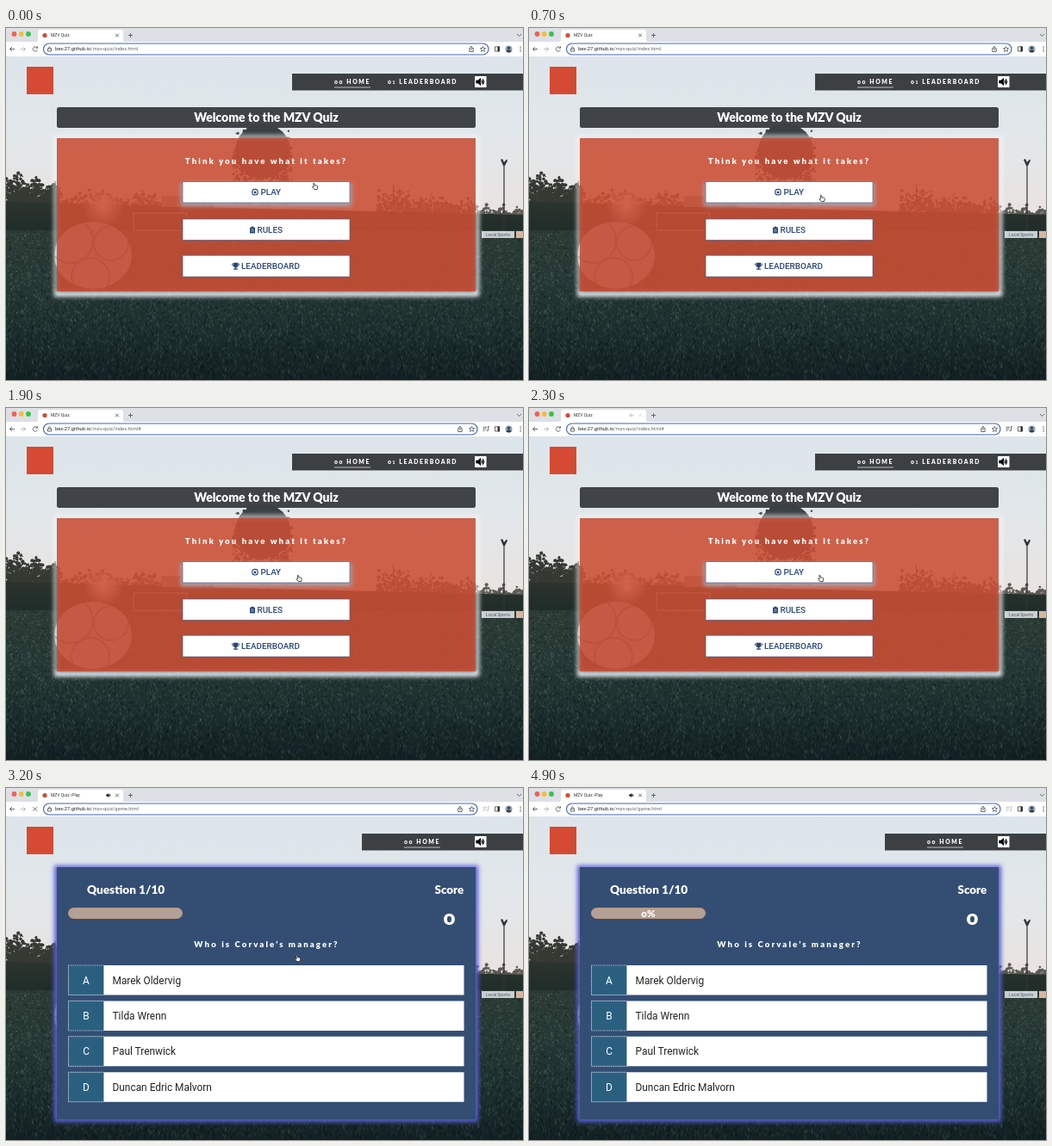
These frames come from a looping animation (600 px wide and 409 px high, 5000 ms). An HTML page with a canvas:

```html
<!DOCTYPE html>
<html lang="en">
<head>
<meta charset="utf-8">
<title>MZV Quiz</title>
<style>
  html, body { margin: 0; width: 100%; height: 100%; overflow: hidden; background: #1b2a2e; }
  canvas, svg { position: absolute; left: 0; top: 0; width: 600px; height: 409px; }
  text { font-family: Roboto, Inter, sans-serif; white-space: pre; }
  .head, .head text { font-family: Lato, sans-serif; font-weight: 900; fill: #fff; }
  .mid { text-anchor: middle; }
  .wide { font-size: 9.6px; letter-spacing: 2.1px; }
  .nav { font-size: 6.8px; letter-spacing: 1.6px; }
  .btn { font-size: 9.9px; font-weight: 500; fill: #27467a; }
  .ans { font-size: 11.9px; fill: #222; }
  .line { fill: none; stroke: #555b62; stroke-width: .9; }
</style>
</head>
<body>
<canvas id="photo" width="600" height="409"></canvas>
<svg viewBox="0 0 600 409">
  <defs>
    <filter id="glow" x="-10%" y="-20%" width="120%" height="140%"><feGaussianBlur stdDeviation="2.6"/></filter>
    <clipPath id="tabClip"><path d="M51 2H113V16H51z"/></clipPath>
    <path id="speaker" d="M0 -1.5H2L5 -4V4L2 1.5H0zM6.2 -2Q7.8 0 6.2 2M7.6 -3.6Q10.4 0 7.6 3.6" stroke="#111" stroke-width=".9"/>
  </defs>

  <!-- browser bar -->
  <path fill="#dde1e6" d="M0 0H600V17H0z"/>
  <path fill="#fff" d="M34 17Q37 17 37 13V5Q37 2 40 2H133Q136 2 136 5V13Q136 17 139 17zM0 16H600V33H0z"/>
  <circle cx="9.5" cy="7" r="2.9" fill="#f25f57"/>
  <circle cx="17.7" cy="7" r="2.9" fill="#f6bc3a"/>
  <circle cx="26" cy="7" r="2.9" fill="#35c24a"/>
  <circle cx="45" cy="8.5" r="2.6" fill="#d64a33"/>
  <text id="tab" x="52" y="10.4" font-size="5" fill="#333" clip-path="url(#tabClip)"></text>
  <g id="tabSound" transform="translate(116.5 8.5) scale(.5)"><use href="#speaker"/></g>
  <path id="tabClose" class="line" d="M127.2 6.7L130.8 10.3M130.8 6.7L127.2 10.3"/>
  <path class="line" d="M144.5 6V11M142 8.5H147M593 7L595.5 9.5L598 7"/>
  <path class="line" d="M10 24.5H4.5M7 22L4.5 24.5L7 27"/>
  <path class="line" stroke-opacity=".45" d="M17 24.5H22.5M20 22L22.5 24.5L20 27"/>
  <path id="reload" class="line" d="M36.2 23A2.7 2.7 0 1 0 36.4 25.6M36.5 21.3V23.3H34.5"/>
  <path id="stop" class="line" d="M31.5 22.2L36 26.7M36 22.2L31.5 26.7"/>
  <rect id="bar" x="43.5" y="18" height="13" rx="6.5" fill="#fff" stroke="#4565b5" stroke-width="1.2"/>
  <path class="line" d="M48.5 24H52.5V27H48.5zM49.3 24V22.8Q50.5 20.8 51.7 22.8V24"/>
  <text x="57" y="26.4" font-size="5.8" fill="#222">bex-27.github.io<tspan id="path" fill="#666"></tspan></text>
  <path id="share" class="line" d="M-1 -1H-2.2V3H2.2V-1H1M0 1.5V-3.2M-1.3 -2L0 -3.3L1.3 -2"/>
  <path id="star" class="line" d="M0 -3L.9 -1L3 -.8L1.4 .7L1.9 2.8L0 1.7L-1.9 2.8L-1.4 .7L-3 -.8L-.9 -1z"/>
  <path id="music" class="line" d="M553.5 22.3H558M553.5 24.3H557M553.5 26.3H555.5M559.5 21.5V26.3M557.5 26.4H559.5M559.5 21.7H561"/>
  <path class="line" d="M567.5 21.8H572.5V27H567.5z"/><path fill="#333" d="M570.5 21.5H573V27.3H570.5z"/>
  <circle cx="583.5" cy="24.5" r="4" fill="#8fa3b4"/>
  <path fill="#34404b" d="M580.3 27Q583.5 23.5 586.7 27Q583.5 30 580.3 27z"/><circle cx="583.5" cy="23.2" r="1.6" fill="#34404b"/>
  <path fill="#444" d="M596.5 21.5h1.2v1.2h-1.2zm0 2.4h1.2v1.2h-1.2zm0 2.4h1.2v1.2h-1.2z"/>

  <!-- site header -->
  <rect x="24" y="45" width="31" height="32" fill="#d64a33"/>
  <path id="navBar" fill="#3c4043"/>
  <!-- lowercase o stands for the old-style zero -->
  <g id="home" class="head nav"><text y="65">oo HOME</text><path d="M0 69H42" stroke="#ddd" stroke-width=".8"/></g>
  <rect x="544" y="56" width="13.5" height="13" fill="#fff"/>
  <use href="#speaker" transform="translate(545.8 62.5)"/>

  <g id="menu">
    <text class="head nav" x="443" y="65">o<tspan font-size="5">1</tspan> LEADERBOARD</text>
    <path d="M56 125H549V312H56zM59 128V306H545V128z" fill="#f2f4fb" fill-rule="evenodd" filter="url(#glow)"/>
    <rect x="59" y="92" width="486" height="24" rx="2.5" fill="#3b3e43" fill-opacity=".97"/>
    <text class="head mid" x="302" y="109" font-size="14">Welcome to the MZV Quiz</text>
    <path d="M59 128H545V306H59z" fill="#cb4e35" fill-opacity=".88"/>
    <text class="head mid wide" x="302" y="157.5">Think you have what it takes?</text>
    <path d="M203 180H401V207H203z" fill="#a3b4c4" fill-opacity=".8" filter="url(#glow)"/>
    <path d="M205 178.5H399V203H205zM205 222H399V246.5H205zM205 264.2H399V289H205z" fill="#fff" stroke="#4a5f8c" stroke-width=".7"/>
    <text class="btn" x="295.5" y="194">PLAY</text>
    <text class="btn" x="291.5" y="237.7">RULES</text>
    <text class="btn" x="273" y="279.7">LEADERBOARD</text>
    <circle cx="289" cy="190.7" r="3.3" fill="#fff" stroke="#27467a" stroke-width="1.1"/>
    <path fill="#27467a" d="M289 189.2L290.6 190.4L290 192.2H288L287.4 190.4zM288 187h2v1h-2zM285.5 193l2 0l0 1.6zM292.5 193l-2 0l0 1.6z"/>
    <path fill="#27467a" d="M283 231.8H284.6V230.8H287.4V231.8H289V238.6H283z"/>
    <path stroke="#fff" stroke-width=".6" d="M284.3 234H287.7M284.3 236H287.7"/>
    <path fill="#27467a" d="M264 272.8H269V276Q269 278 267.2 278.4V279.5H269V280.7H264V279.5H265.8V278.4Q264 278 264 276z"/>
    <path fill="none" stroke="#27467a" stroke-width=".9" d="M264 274H262.4Q262.4 276.7 265 277M269 274H270.6Q270.6 276.7 268 277"/>
  </g>

  <g id="game">
    <path d="M56 90H548V388H56z" fill="#5a62d8" filter="url(#glow)"/>
    <path d="M59 92H545V385H59z" fill="#344e73"/>
    <text class="head" x="94" y="122.5" font-size="13.6">Question 1/10</text>
    <text class="head" x="497.5" y="122.5" font-size="13.4">Score</text>
    <text class="head mid" x="514.5" y="159" font-size="24">o</text>
    <rect x="72.5" y="139.5" width="132" height="12" rx="6" fill="#b3a197" stroke="#c2977a"/>
    <text id="percent" class="head mid" x="138.5" y="149.5" font-size="11.5">o%</text>
    <text class="head mid wide" x="302.5" y="184.5">Who is Corvale’s manager?</text>
    <g id="answers"></g>
  </g>

  <path id="hand" fill="#fff" stroke="#222" stroke-width=".8" stroke-linejoin="round"
    d="M-1.8 -3.5Q-1 -4.3 -.5 -3.2L0 -1.2L2.6 -.7Q3.4 -.4 3.2 .8L2.6 3.6H-.8L-3 .7Q-2.8 -.3 -1.2 .4z"/>
</svg>
<script>
const $ = id => document.getElementById(id);
const show = (id, opacity) => $(id).setAttribute('opacity', +opacity);
const move = (id, x, y) => $(id).setAttribute('transform', `translate(${x} ${y})`);
const clamp = v => Math.max(0, Math.min(1, v));

$('answers').innerHTML = ['Marek Oldervig', 'Tilda Wrenn', 'Paul Trenwick', 'Duncan Edric Malvorn'].map((name, i) => {
  const y = 206 + i * 41.4;
  return `<path d="M72.5 ${y}h459v34.5h-459z" fill="#fff"/>
    <path d="M72.5 ${y}h41v34.5h-41z" fill="#2b5f80" stroke="#b9c8d8" stroke-width=".8" stroke-dasharray="1.5 1"/>
    <text class="ans mid" x="93" y="${y + 21.5}" style="fill:#fff">${'ABCD'[i]}</text>
    <text class="ans" x="123.5" y="${y + 21.5}">${name}</text>`;
}).join('');

function drawPhoto() {
  const c = $('photo').getContext('2d');
  let seed = 7;
  const rnd = () => (seed = seed * 16807 % 2147483647) / 2147483647;
  const shade = (y0, y1, ...stops) => {
    const g = c.createLinearGradient(0, y0, 0, y1);
    stops.forEach((s, i) => g.addColorStop(i / (stops.length - 1), s));
    c.fillStyle = g;
  };
  const area = (...points) => {
    c.beginPath();
    for (let i = 0; i < points.length; i += 2) c.lineTo(points[i], points[i + 1]);
    c.fill();
  };
  const oval = (x, y, rx, ry = rx) => {
    c.beginPath();
    c.ellipse(x, y, rx, ry, 0, 0, 7);
  };
  // leaves thicken downwards; the top edge runs from y0 to y1
  const leaves = (n, x, w, y0, y1, bottom, color) => {
    c.fillStyle = color;
    for (let i = 0; i < n; i++) {
      const u = rnd(), top = y0 + (y1 - y0) * u + 5 * Math.sin(u * 19);
      oval(x + w * u, top + (bottom - top) * Math.sqrt(rnd()), .6 + 1.5 * rnd());
      c.fill();
    }
  };

  shade(33, 216, '#dce5eb', '#e2e7ea', '#e9e3e0');
  c.fillRect(0, 33, 600, 190);
  leaves(1100, 0, 62, 166, 184, 206, '#353a33');
  leaves(700, 60, 180, 186, 200, 212, '#515245');
  leaves(600, 430, 118, 184, 204, 216, '#4e5049');
  leaves(160, 545, 55, 206, 212, 218, '#5c5a54');
  leaves(700, 264, 68, 114, 112, 205, '#394143');
  c.fillStyle = '#394143';
  oval(298, 143, 32, 32);
  c.fill();

  shade(203, 237, '#2b342e', '#1f2c29');
  area(0, 202, 300, 210, 600, 217, 600, 237, 0, 237);
  shade(235, 409, '#2c3b35', '#273935', '#1d2f2e', '#122023');
  area(0, 235, 600, 235, 600, 409, 0, 409);
  for (let i = 0; i < 9000; i++) {
    const d = rnd(), y = 236 + 173 * d, x = 600 * rnd();
    c.strokeStyle = rnd() < .5 ? `rgba(120,150,130,${.38 - .24 * d})` : 'rgba(6,16,18,.4)';
    c.beginPath();
    c.moveTo(x, y);
    c.lineTo(x + 4 * rnd() - 2, y - 1 - 3 * d);
    c.stroke();
  }

  const sun = c.createRadialGradient(113, 207, 0, 113, 207, 24);
  sun.addColorStop(0, '#fff');
  sun.addColorStop(1, '#fff0');
  c.fillStyle = sun;
  c.fillRect(85, 180, 56, 56);
  c.strokeStyle = '#aab2b2';
  c.strokeRect(148, 215, 62, 20);
  c.fillStyle = '#89918f';
  c.fillRect(180, 195, 48, 13);

  // ball
  c.save();
  c.fillStyle = '#a9b1b1';
  oval(101, 264, 45, 39);
  c.fill();
  c.clip();
  c.strokeStyle = '#5f6c6f';
  c.lineWidth = 2;
  for (const [x, y, r] of [[75, 247, 26], [122, 250, 20], [98, 289, 22]]) {
    oval(x, y, r);
    c.stroke();
  }
  c.restore();

  // floodlight and boards
  c.fillStyle = '#303638';
  c.fillRect(577.4, 157, 1.2, 78);
  area(574, 153, 576, 152, 578, 156, 581, 152.5, 582, 154, 579, 160, 577, 160);
  c.fillRect(449, 182, 1, 28);
  c.fillStyle = '#c9d0d5';
  c.fillRect(552, 236, 38, 8);
  c.fillStyle = '#d7b5a0';
  c.fillRect(592, 236, 8, 8);
  c.fillStyle = '#4d5960';
  c.font = '5px Roboto, sans-serif';
  c.fillText('Local Sports', 557, 242);
}

function draw() {
  const t = performance.now() % 5000;
  const game = t >= 3200, clicked = t >= 1200, opening = t >= 3000, loading = opening && t < 3600;
  const k = clamp((t - 50) / 600), ease = k * k * (3 - 2 * k), drift = clamp((t - 1900) / 300);

  show('menu', !game);
  show('game', game);
  $('navBar').setAttribute('d', `M${game ? 413 : 332} 53H600V72.5H${game ? 413 : 332}z`);
  move('home', game ? 462 : 381, 0);

  $('tab').textContent = game ? 'MZV Quiz -Play' : opening ? 'bex-27.github.io/mzv-quiz/game.html' : 'MZV Quiz';
  $('path').textContent = '/mzv-quiz/' + (opening ? 'game.html' : clicked ? 'index.html#' : 'index.html');
  show('tabSound', clamp((t - 2250) / 250));
  show('tabClose', t < 2200 || t >= 2500 ? 1 : .2);
  show('reload', !loading);
  show('stop', loading);
  show('share', game || !opening);
  $('bar').setAttribute('width', clicked ? 503.5 : 516.5);
  move('share', clicked ? 527 : 540, 24.5);
  move('star', clicked ? 540.5 : 553.5, 24.5);
  show('music', opening ? .4 : clicked);

  show('percent', t >= 3600);
  move('hand', 358.5 - 18.5 * ease - 1.5 * drift, 184 + 14 * ease);
  show('hand', t < 4000);
  requestAnimationFrame(draw);
}
drawPhoto();
draw();
</script>
</body>
</html>
```
